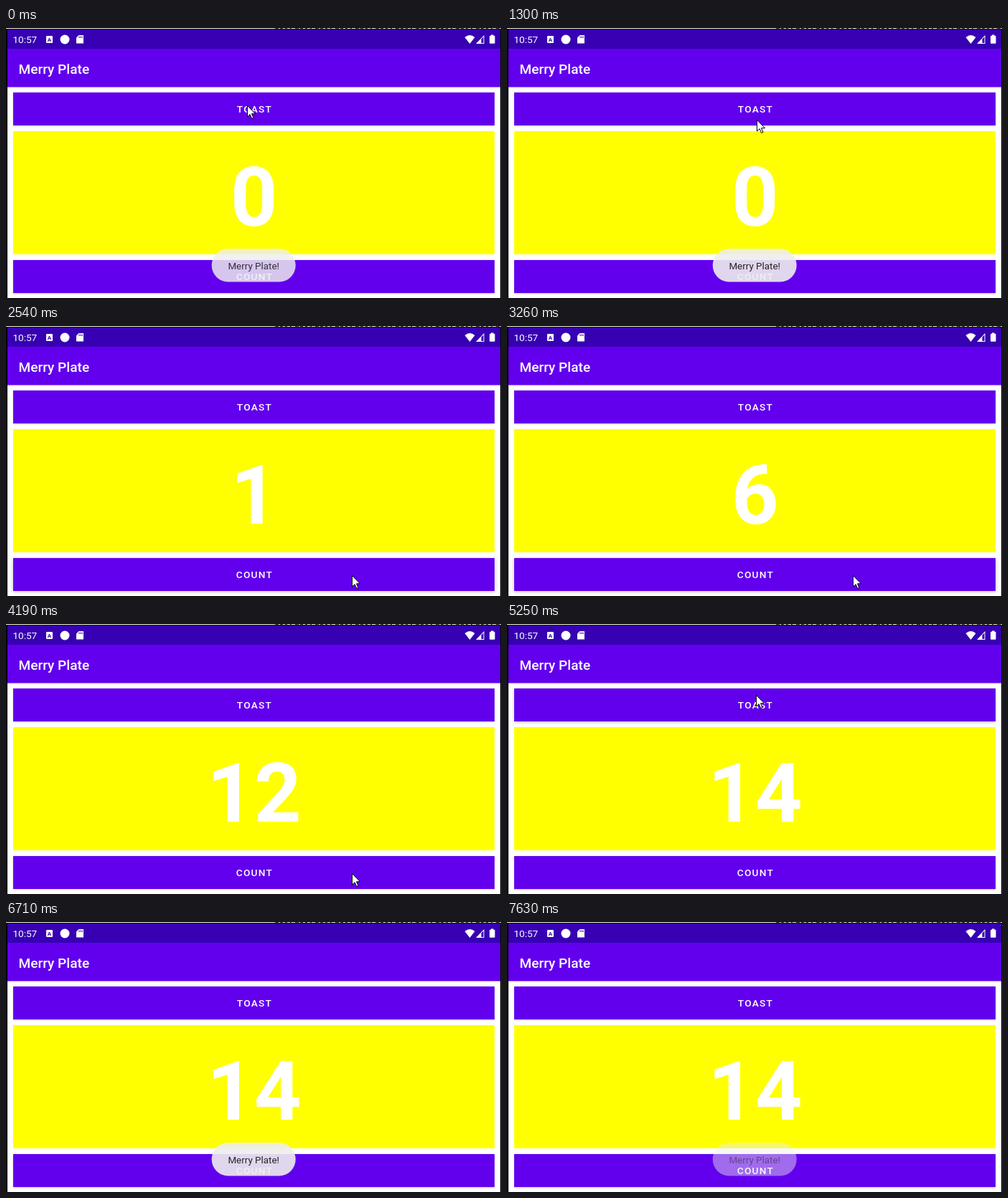
Write an HTML page with a canvas that moves like this. It is 690 px wide and 377 px high and loops after 7.73 s.

```html
<!DOCTYPE html>
<html lang="en">
<head>
<meta charset="utf-8">
<title>Toast counter</title>
<style>
html, body { margin: 0; width: 100%; height: 100%; overflow: hidden; background: #fff; }
canvas { display: block; }
</style>
</head>
<body>
<canvas id="stage" width="690" height="377"></canvas>
<script>
const ctx = document.getElementById('stage').getContext('2d');
const LOOP = 7730;
const BEAT = 133;
const LAST_BEAT = 57;
const PURPLE = '#6200ee', DARK = '#3700b3';

const clamp = (v, lo = 0, hi = 1) => Math.min(hi, Math.max(lo, v));
const smooth = u => u * u * (3 - 2 * u);

// Pointer glides: first and last beat, then where each one ends.
const home = { x: 336, y: 108 };
const glides = [
  { from: 8, to: 13.7, x: 482, y: 348 },
  { from: 33, to: 34, x: 324, y: 89 },
  { from: 34, to: 37, x: 347, y: 99 },
  { from: 47, to: 48, x: 360, y: 111 },
  { from: 48, to: 50, x: 868, y: 567 },
];

function pointerAt(beat) {
  let { x, y } = home;
  for (const g of glides) {
    const u = smooth(clamp((beat - g.from) / (g.to - g.from)));
    x += (g.x - x) * u;
    y += (g.y - y) * u;
  }
  return { x: Math.round(x), y: Math.round(y) };
}

const countAt = beat => clamp(Math.round((beat - 18) * 0.93), 0, 14);

// Fades in over 2.5 beats and out over 4.
const fade = (beat, from, to) => clamp(Math.min((beat - from) / 2.5, (to - beat) / 4));
const toastAt = beat => Math.max(fade(beat, -2.3, 15.5), fade(beat, 41, 59));

// Button elevation while it is being tapped.
const countLift = beat =>
  beat < 19 || beat > 33 ? 0 : 0.5 + 0.5 * Math.cos((beat - 19) * Math.PI * 0.4);
const toastLift = beat => Math.sin(Math.PI * clamp((beat - 38) / 5));

function box(x, y, w, h, color) {
  ctx.fillStyle = color;
  ctx.fillRect(x, y, w, h);
}

function shape(points, color) {
  ctx.beginPath();
  points.forEach(([x, y]) => ctx.lineTo(x, y));
  ctx.closePath();
  ctx.fillStyle = color;
  ctx.fill();
}

function round(x, y, w, h, r, color) {
  ctx.beginPath();
  ctx.roundRect(x, y, w, h, r);
  ctx.fillStyle = color;
  ctx.fill();
}

function raised(x, y, w, h, alpha, blur, drop) {
  ctx.save();
  ctx.shadowColor = `rgba(0,0,0,${alpha})`;
  ctx.shadowBlur = blur;
  ctx.shadowOffsetY = drop;
  box(x, y, w, h, PURPLE);
  ctx.restore();
}

function text(str, x, y, size, weight, color, align = 'left', spacing = 0) {
  ctx.font = `${weight} ${size}px Roboto, sans-serif`;
  ctx.letterSpacing = spacing + 'px';
  ctx.textAlign = align;
  ctx.fillStyle = color;
  ctx.fillText(str, x, y);
}

function button(label, y, lift) {
  raised(10, y, 671, 46, 0.25 + 0.06 * lift, 2 + 3 * lift, 0.6 + 0.5 * lift);
  text(label, 346.4, y + 28.4, 13.7, 500, '#fff', 'center', 1.2);
}

function statusBar() {
  box(2, 2, 687, 27, DARK);
  text('10:57', 9.4, 21, 13.6, 400, '#fff');

  round(56, 11, 9, 10, 1, '#fff');
  text('A', 60.5, 19, 8, 700, DARK, 'center');
  round(75.5, 9.5, 13, 13, 6.5, '#fff');

  // memory card
  shape([[101.5, 10], [108, 10], [108, 21.5], [98, 21.5], [98, 13.5]], '#fff');
  for (let i = 0; i < 3; i++) box(101.5 + 2.1 * i, 11.5, 1, 2.5, DARK);

  // wireless
  ctx.beginPath();
  ctx.moveTo(646.5, 22);
  ctx.lineTo(639.5, 13);
  ctx.quadraticCurveTo(646.5, 7, 653.5, 13);
  ctx.closePath();
  ctx.fillStyle = '#fff';
  ctx.fill();

  // signal, with its last bar hollow
  shape([[655, 22], [666.5, 22], [666.5, 10]], '#fff');
  shape([[662.5, 21], [665.5, 21], [665.5, 12.5], [662.5, 15.6]], DARK);

  // battery
  box(676, 9.5, 3.5, 2, '#fff');
  round(674, 10.8, 7.5, 11, 1, '#fff');
}

function frameEdges() {
  box(0, 0, 690, 1, '#eee');
  for (let x = 375; x < 688; x += 7) box(x, 0, 2 + x % 4, 1, '#444');
  box(0, 1, 690, 1, '#111');
  box(0, 1, 2, 376, '#000');
  box(689, 1, 1, 376, '#000');
}

function toast(alpha) {
  ctx.save();
  ctx.globalAlpha = alpha;
  round(286.7, 308.2, 117, 46.3, 23, 'rgba(238,238,238,0.9)');
  text('Merry Plate!', 345.2, 336.5, 13.4, 400, '#242424', 'center');
  ctx.restore();
}

function arrow({ x, y }) {
  ctx.save();
  ctx.translate(x + 0.5, y + 0.5);
  shape([[0, 0], [0, 15.5], [3.6, 12.2], [6.2, 18], [8.5, 17], [6, 11.3], [11, 11.3]], '#fff');
  ctx.strokeStyle = '#000';
  ctx.lineWidth = 1;
  ctx.stroke();
  ctx.restore();
}

function draw(t) {
  const beat = Math.min(Math.floor(t / BEAT), LAST_BEAT);
  box(0, 0, 690, 377, '#fff');
  raised(2, 29, 687, 53.5, 0.14, 3, 0.5);
  statusBar();
  text('Merry Plate', 17.5, 64, 19.1, 500, '#fff');

  button('TOAST', 90, toastLift(beat));
  box(10, 144, 671, 172, '#ff0');
  text(countAt(beat), 345.8, 276, 114.9, 700, '#fff', 'center');
  button('COUNT', 324, countLift(beat));

  toast(toastAt(beat));
  frameEdges();
  arrow(pointerAt(beat));
}

const start = performance.now();
function tick() {
  draw((performance.now() - start) % LOOP);
  requestAnimationFrame(tick);
}
tick();
</script>
</body>
</html>
```
